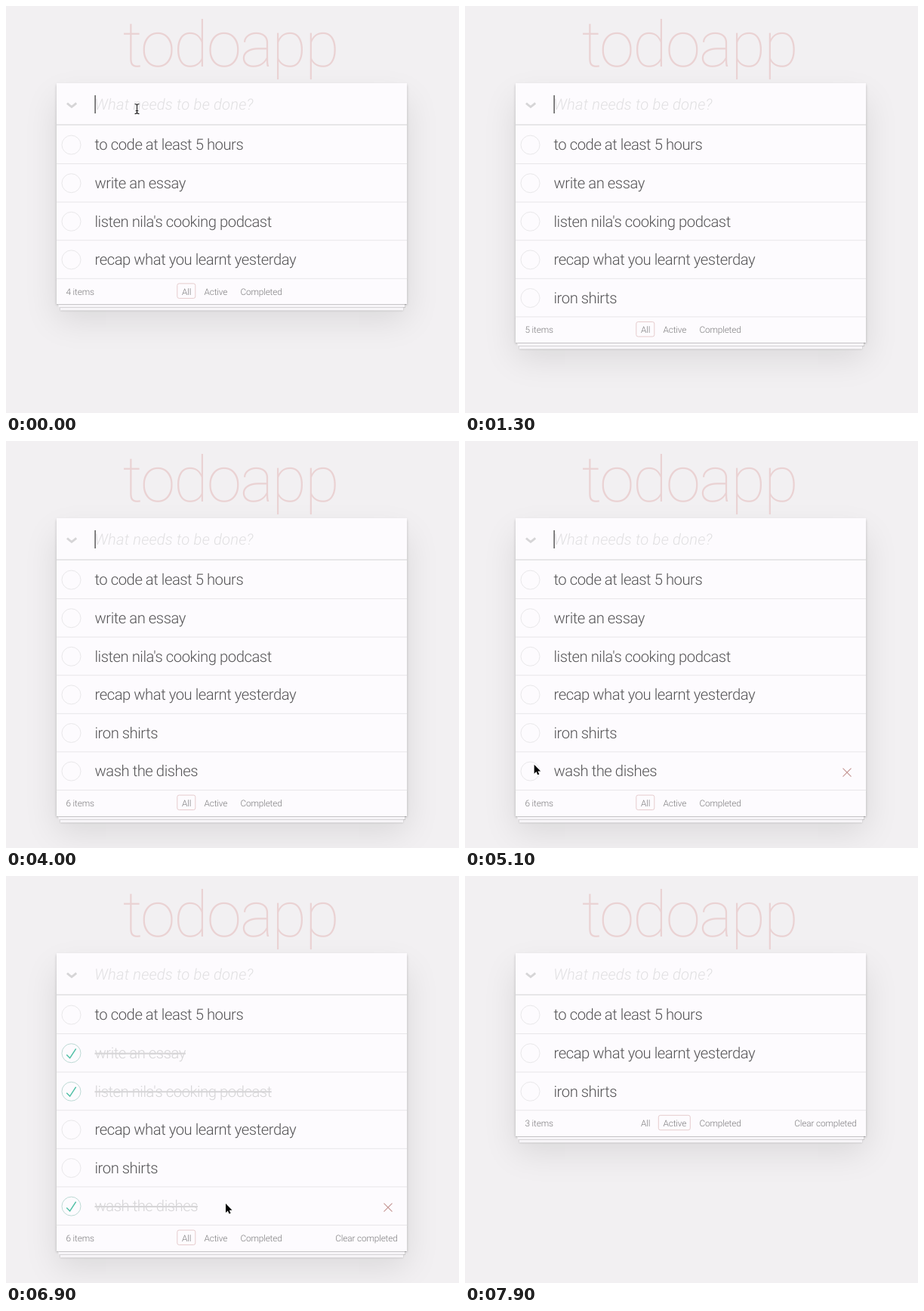
These frames come from a looping animation (600x538 px, 8000 ms). An HTML page:

```html
<!DOCTYPE html>
<html lang="en">
<head>
<meta charset="utf-8">
<title>todoapp</title>
<style>
  html, body { margin: 0; width: 100%; height: 100%; overflow: hidden; background: #f2f0f2; }
  #stage { position: relative; width: 600px; height: 538px; overflow: hidden; }
  #card, #stack { position: absolute; left: 67px; width: 464px; background: #fdfbfe; }
  #card { top: 102px; box-shadow: 0 1.7px 3.4px rgba(0,0,0,.2), 0 21px 42px rgba(0,0,0,.1); }
  #stack {
    height: 34px;
    box-shadow: 0 .9px .9px rgba(0,0,0,.2), 0 6.8px 0 -2.5px #f7f5f8, 0 7.6px .9px -2.5px rgba(0,0,0,.2),
      0 13.5px 0 -5px #f7f5f8, 0 14.4px 1.7px -5px rgba(0,0,0,.2);
  }
  svg { position: absolute; left: 0; top: 0; }
  text {
    font-family: Roboto, "Liberation Sans", sans-serif; font-weight: 300;
    white-space: pre; text-rendering: geometricPrecision;
  }
  .title { font-size: 84px; font-weight: 100; letter-spacing: -2.2px; fill: #ead2d3; }
  .todo { font-size: 20.25px; letter-spacing: -.46px; fill: #565557; }
  .done { fill: #d6d5d7; text-decoration: line-through; }
  .hint { font-size: 20.25px; letter-spacing: .17px; font-style: italic; fill: #e1e0e2; }
  .foot { font-size: 11.8px; letter-spacing: -.15px; fill: #7c7b7d; }
</style>
</head>
<body>
<div id="stage">
  <div id="card"></div>
  <div id="stack"></div>
  <svg width="600" height="538" viewBox="0 0 600 538">
    <text class="title" x="154.5" y="80">todoapp</text>
    <path d="M81 128.4Q84 131.2 87 133.4Q90 131.2 93.2 128.4" fill="none" stroke="#d6d5d7" stroke-width="2.8"/>
    <rect x="67" y="156" width="464" height="2" fill="#e7e6e8"/>
    <g id="view"></g>
  </svg>
</div>
<script>
const LOOP = 8000, STEP = 100;
const TOP = 157.6, PITCH = 50.6, FOOT = 34.4;
const BLUR = 5200, FILTERED = 7500;

const todos = [
  { text: "to code at least 5 hours", from: 0 },
  { text: "write an essay", from: 0, done: 6200 },
  { text: "listen nila's cooking podcast", from: 0, done: 6000 },
  { text: "recap what you learnt yesterday", from: 0 },
  { text: "iron shirts", from: 1300 },
  { text: "wash the dishes", from: 4000, done: 5300 }
];

// Letters of a burst are spread evenly from its start to its end.
const bursts = [
  [200, 600, "iron"], [700, 1300, " shirts"],
  [2000, 2200, "was"], [2400, 2600, "h "], [2800, 3300, "the dis"], [3400, 3500, "h"], [3800, 4000, "es"]
];

// Pointer stops: time, x, y
const stops = [
  [4400, 173, 130], [5200, 88, 441], [5400, 88, 441], [5900, 91, 275], [6200, 90, 214],
  [6400, 130, 162], [6900, 291, 433], [7000, 298, 519], [7300, 276, 477], [FILTERED, 276, 477], [7900, 226, 185]
];

const filters = [
  { name: "All", x: 233, w: 24 },
  { name: "Active", x: 262.5, w: 42 },
  { name: "Completed", x: 310.5 }
];

const $ = id => document.getElementById(id);
const ease = k => k * k * (3 - 2 * k);
const label = (cls, x, y, s, more = "") => `<text class="${cls}" x="${x}" y="${y}" ${more}>${s}</text>`;
const rule = y => `<rect x="67" y="${y}" width="464" height="1" fill="#e8e7e9"/>`;

function pointer(t) {
  if (t < bursts[0][0]) return { x: 173.5, y: 136 };
  if (t < stops[0][0]) return null;
  const i = Math.max(1, stops.findIndex(s => s[0] > t));
  const [t0, x0, y0] = stops[i - 1], [t1, x1, y1] = stops[i];
  const k = ease((t - t0) / (t1 - t0));
  return { x: x0 + (x1 - x0) * k, y: y0 + (y1 - y0) * k };
}

const lastEnter = t => Math.max(...todos.map(d => d.from).filter(at => at <= t));

function typed(t) {
  const since = lastEnter(t);
  return bursts.filter(([from]) => from >= since && from <= t).map(([from, to, s]) =>
    s.slice(0, Math.ceil(s.length * (t - from + STEP) / (to - from)))).join("");
}

// The blink restarts with every key.
function caretOn(t) {
  const keys = bursts.filter(([from]) => from <= t).map(([, to]) => Math.min(t, to - STEP));
  return t < BLUR && (t - Math.max(lastEnter(t), ...keys)) % 500 < 200;
}

function row(todo, i, t, hover) {
  const y = TOP + i * PITCH, mid = y + 26, done = t >= todo.done;
  let s = `<circle cx="86.5" cy="${mid}" r="12.5" fill="none" stroke="${done ? "#bddad5" : "#e9e8ea"}"/>`;
  if (done) s += `<path transform="translate(74 ${mid - 12.5}) scale(.25)" fill="#4fbfa5" d="M72 25L42 71 27 56l-4 4 20 20 34-52z"/>`;
  if (hover) s += `<path d="M500.5 ${mid - 4}l11 11m0-11l-11 11" stroke="#c69896" stroke-width="1.1"/>`;
  return s + label(done ? "todo done" : "todo", 117.5, y + 32.8, todo.text) + rule(y + PITCH - .2);
}

function footer(y, count, active, over, clear) {
  let s = label("foot", 79.5, y + 21.7, count + " items");
  filters.forEach((f, i) => {
    const color = i === active ? "#e6cccd" : i === over ? "#eddcde" : "";
    if (color) s += `<rect x="${f.x - 6.2}" y="${y + 6.9}" width="${f.w}" height="19.5" rx="2.5" fill="none" stroke="${color}"/>`;
    s += label("foot", f.x, y + 21.7, f.name);
  });
  return clear ? s + label("foot", 518.6, y + 21.7, "Clear completed", 'text-anchor="end"') : s;
}

function cursor({ x, y }) {
  if (y < TOP) {
    const d = "M-3-6.5Q0-6.5 0-4.5V4.5Q0 6.5-3 6.5M3-6.5Q0-6.5 0-4.5M0 4.5Q0 6.5 3 6.5M-1.8 2.5H1.8";
    return `<g transform="translate(${x} ${y})" fill="none"><path d="${d}" stroke="#fdfbfe" stroke-width="3"/>` +
      `<path d="${d}" stroke="#222" stroke-width="1.2"/></g>`;
  }
  return `<path transform="translate(${x} ${y})" d="M0 0V12L2.8 9.4 4.6 13.6 6.6 12.8 4.8 8.8H8.5Z" ` +
    `fill="#000" stroke="#fff" stroke-width=".9" paint-order="stroke"/>`;
}

function render(t) {
  const active = t >= FILTERED ? 1 : 0;
  const list = todos.filter(d => t >= d.from && !(active && d.done));
  const foot = TOP + list.length * PITCH;
  const p = pointer(t), entry = typed(t), caret = caretOn(t);
  const hover = p ? Math.floor((p.y - TOP) / PITCH) : -1;
  const over = p && p.x > 256 && p.x < 298 && p.y > foot + 6 && p.y < foot + 27 ? 1 : -1;

  $("card").style.height = foot + FOOT - 102 + "px";
  $("stack").style.top = foot + FOOT - 34 + "px";
  $("view").innerHTML =
    (entry ? label("todo", 117.5, 137.4, entry, 'id="entry"') : label("hint", 117.2, 137.4, "What needs to be done?")) +
    list.map((d, i) => row(d, i, t, i === hover)).join("") +
    footer(foot, list.length, active, over, t >= todos[5].done) +
    (caret ? '<rect id="caret" x="117.5" y="118" width="1.2" height="24" fill="#333"/>' : "") +
    (p ? cursor(p) : "");
  if (caret && entry) $("caret").setAttribute("x", 117.5 + $("entry").getComputedTextLength());
}

const start = performance.now();
let shown = -1;
function tick() {
  const t = Math.floor((performance.now() - start) % LOOP / STEP) * STEP;
  if (t !== shown) render(shown = t);
  requestAnimationFrame(tick);
}
tick();
</script>
</body>
</html>
```
